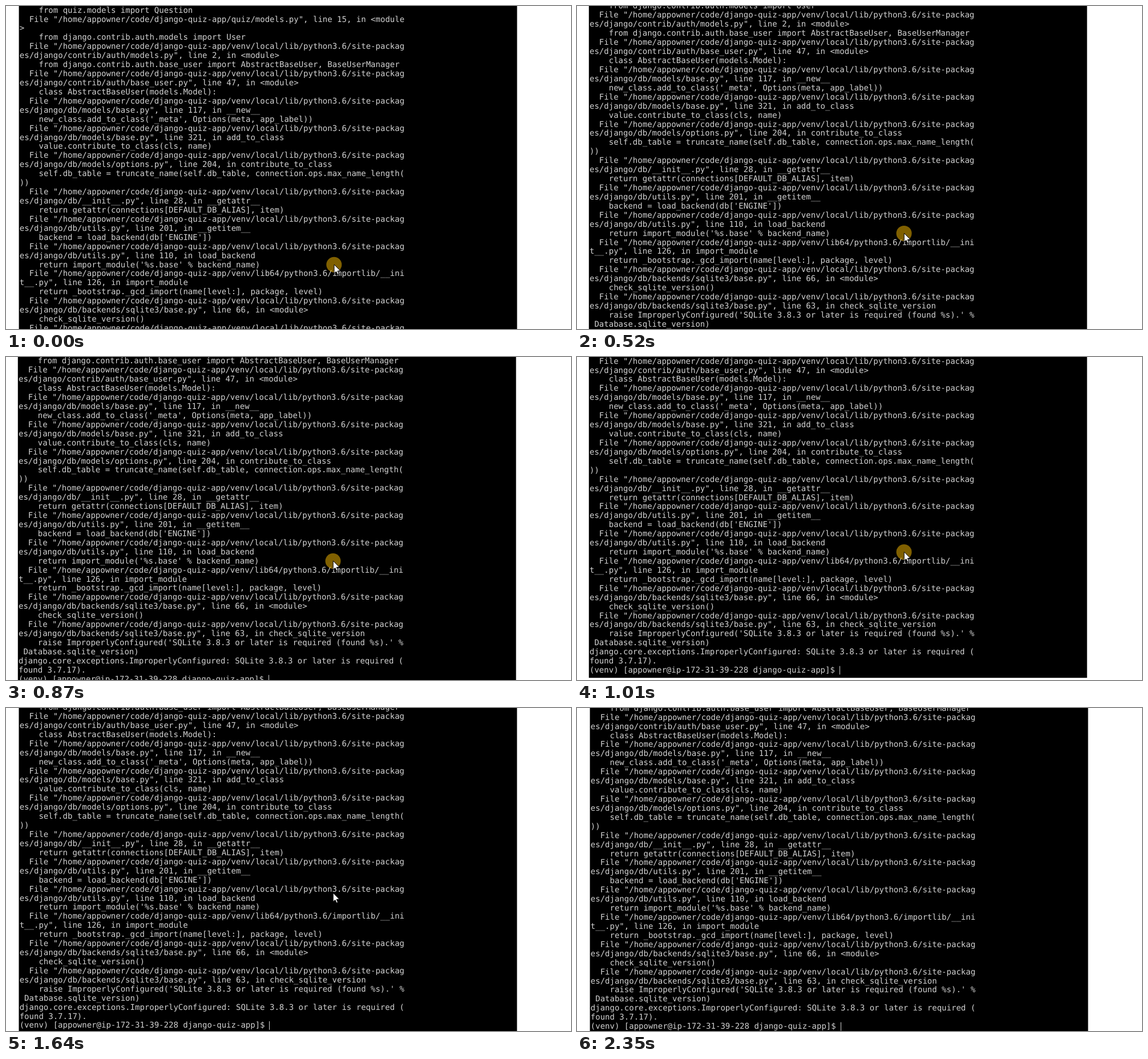
Write an HTML page with a canvas that moves like this. It is 990 px wide and 566 px high and loops after 2750 ms.

```html
<!DOCTYPE html>
<html lang="en">
<head>
<meta charset="utf-8">
<title>Terminal traceback</title>
<style>
  html, body { margin: 0; width: 100%; height: 100%; overflow: hidden; background: #fff; }
  canvas { display: block; }
</style>
</head>
<body>
<canvas id="stage" width="990" height="566"></canvas>
<script>
const ctx = document.getElementById('stage').getContext('2d');
const LOOP = 2750, COLUMNS = 80, ROW = 15.926;
const app = '/home/appowner/code/django-quiz-app';
const site = app + '/venv/local/lib/python3.6/site-packages/django/';

const frame = (path, line, where, code) =>
  [`  File "${path}", line ${line}, in ${where}`, '    ' + code];

const log = [
  '    from quiz.models import Question',
  ...frame(app + '/quiz/models.py', 15, '<module>', 'from django.contrib.auth.models import User'),
  ...frame(site + 'contrib/auth/models.py', 2, '<module>',
    'from django.contrib.auth.base_user import AbstractBaseUser, BaseUserManager'),
  ...frame(site + 'contrib/auth/base_user.py', 47, '<module>', 'class AbstractBaseUser(models.Model):'),
  ...frame(site + 'db/models/base.py', 117, '__new__',
    "new_class.add_to_class('_meta', Options(meta, app_label))"),
  ...frame(site + 'db/models/base.py', 321, 'add_to_class', 'value.contribute_to_class(cls, name)'),
  ...frame(site + 'db/models/options.py', 204, 'contribute_to_class',
    'self.db_table = truncate_name(self.db_table, connection.ops.max_name_length())'),
  ...frame(site + 'db/__init__.py', 28, '__getattr__', 'return getattr(connections[DEFAULT_DB_ALIAS], item)'),
  ...frame(site + 'db/utils.py', 201, '__getitem__', "backend = load_backend(db['ENGINE'])"),
  ...frame(site + 'db/utils.py', 110, 'load_backend', "return import_module('%s.base' % backend_name)"),
  ...frame(app + '/venv/lib64/python3.6/importlib/__init__.py', 126, 'import_module',
    'return _bootstrap._gcd_import(name[level:], package, level)'),
  ...frame(site + 'db/backends/sqlite3/base.py', 66, '<module>', 'check_sqlite_version()'),
  ...frame(site + 'db/backends/sqlite3/base.py', 63, 'check_sqlite_version',
    "raise ImproperlyConfigured('SQLite 3.8.3 or later is required (found %s).' % Database.sqlite_version)"),
  'django.core.exceptions.ImproperlyConfigured: SQLite 3.8.3 or later is required (found 3.7.17).',
  '(venv) [appowner@ip-172-31-39-228 django-quiz-app]$ '
];

// Wrap every line at the terminal width
const rows = log.flatMap(line => line.match(new RegExp(`.{1,${COLUMNS}}`, 'g')));

const FIRST_TICK = 46, TICK = 78.9;          // screen refresh
const RELEASE = 1400, DRAG = 129, REST = 102.4, SPRING = 81;
const LEAVE = 1624, LEAVE_TIME = 640;        // pointer moves off the stage

const clamp = v => Math.min(1, Math.max(0, v));
const swing = p => (1 - Math.cos(Math.PI * p)) / 2;

function refreshTime(time) {
  return time < FIRST_TICK ? 0 : FIRST_TICK + Math.floor((time - FIRST_TICK) / TICK) * TICK;
}

// The page follows the drag, then springs back
function pose(t) {
  const drag = DRAG * swing(clamp(t / RELEASE) ** 0.8);
  const spring = t < RELEASE ? 1 : Math.exp((RELEASE - t) / SPRING);
  const shift = -1.8 * clamp(t / 220);
  const leave = swing(clamp((t - LEAVE) / LEAVE_TIME));
  return {
    left: 22.6 + shift * spring,
    scroll: t < RELEASE ? drag : REST + (drag - REST) * spring,
    x: 575 + shift + 348 * leave,
    y: 453 - drag + 226 * leave ** 1.2,
    pressed: t < RELEASE,
    visible: t < LEAVE + LEAVE_TIME
  };
}

function drawTerminal(left, scroll) {
  const top = 7 - scroll;
  const last = rows.length - 1;
  const lastY = top + last * ROW;
  ctx.fillStyle = '#000';
  ctx.fillRect(left, 0, 872.9, lastY + 13.7);

  ctx.font = '14px "DejaVu Sans Mono", monospace';
  ctx.textRendering = 'geometricPrecision';
  ctx.fillStyle = '#d2d2d2';
  rows.forEach((row, i) => ctx.fillText(row, left + 1.2, top + i * ROW + 4.6));

  const caret = left + 1.2 + ctx.measureText(rows[last]).width;
  ctx.fillRect(Math.round(caret - 0.5), lastY - 7, 1, 15);
}

function drawHalo(x, y) {
  ctx.fillStyle = 'rgba(255, 192, 0, 0.5)';
  ctx.beginPath();
  ctx.arc(x - 0.2, y + 0.3, 13.5, 0, Math.PI * 2);
  ctx.fill();
}

function drawPointer(x, y) {
  ctx.save();
  ctx.translate(x, y);
  ctx.beginPath();
  [[0, 0], [0, 15.5], [3.5, 12.3], [6, 17.5], [8.3, 16.5], [6, 11.3], [10.8, 11]]
    .forEach(([px, py]) => ctx.lineTo(px, py));
  ctx.closePath();
  ctx.fillStyle = '#fff';
  ctx.strokeStyle = '#000';
  ctx.lineWidth = 1;
  ctx.fill();
  ctx.stroke();
  ctx.restore();
}

function draw(time) {
  const { left, scroll, x, y, pressed, visible } = pose(refreshTime(time % LOOP));
  ctx.fillStyle = '#fff';
  ctx.fillRect(0, 0, 990, 566);
  drawTerminal(left, scroll);
  if (pressed) drawHalo(x, y);
  if (visible) drawPointer(x, y);
}

const start = performance.now();
function loop() {
  draw(performance.now() - start);
  requestAnimationFrame(loop);
}
loop();
</script>
</body>
</html>
```
